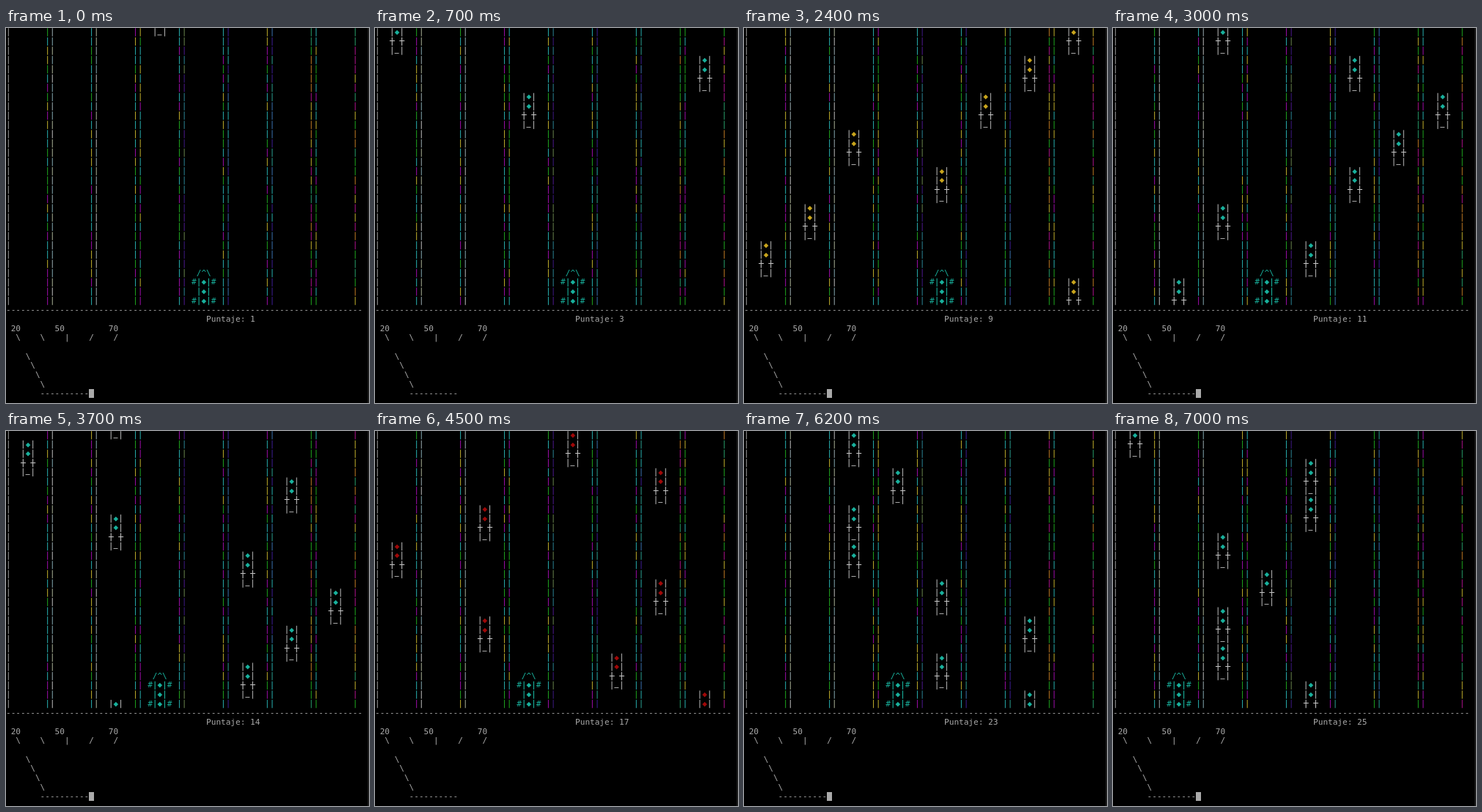
An HTML page with a canvas that plays this animation: 495 px wide and 512 px high, repeating every 7100 ms.

```html
<!DOCTYPE html>
<html lang="es">
<head>
<meta charset="utf-8">
<style>
  html, body { margin: 0; width: 100%; height: 100%; overflow: hidden; background: #000; }
  canvas { display: block; }
</style>
</head>
<body>
<canvas id="screen" width="495" height="512"></canvas>
<script>
const ctx = document.getElementById('screen').getContext('2d');
const LOOP = 7100, STEP = 100;
const CW = 6.66, RH = 12.65, ROAD_ROWS = 30;
const GREY = '#aaaaaa', BRIGHT = '#c4c4c4', TEAL = '#18b09c', YELLOW = '#c8a41c', RED = '#a00808';
const GREEN = '#1c981c', PURPLE = '#900c9c', CYAN = '#24a0a0', GOLD = '#b0a028';

// One car every four rows; each digit is its lane.
const LANES = '3701425675260264642232440';
// Time step and rows scrolled by then.
const SCROLL = [[0, 0], [14, 20], [24, 34], [37, 52], [45, 63], [55, 78], [70, 98]];
const STALLS = [20, 48, 50, 53];
const CURSOR_TOGGLES = [3, 9, 14, 21, 31, 37, 43, 49, 55, 61];

const laneCol = lane => 4 + 9 * lane;

function scrolled(step) {
  const i = Math.max(1, SCROLL.findIndex(([s]) => s >= step));
  const [s0, p0] = SCROLL[i - 1], [s1, p1] = SCROLL[i];
  return Math.round(p0 + (p1 - p0) * (step - s0) / (s1 - s0));
}

function random(a, b, c) {
  const v = Math.sin(a * 12.99 + b * 78.23 + c * 37.72) * 43758.55;
  return v - Math.floor(v);
}

function text(str, col, row, color = GREY) {
  ctx.fillStyle = color;
  [...str].forEach((ch, i) => {
    if (ch !== ' ') ctx.fillText(ch, (col + i) * CW, row * RH + 8.9);
  });
}

function bar(col, row, color = GREY) {
  ctx.fillStyle = color;
  ctx.fillRect(col * CW + 2.8, row * RH + 0.2, 1.1, 11.2);
}

function cross(col, row) {
  bar(col, row, BRIGHT);
  ctx.fillRect(col * CW, Math.round(row * RH + 4.6), 7, 1);
}

function wallColors(col) {
  if (col === 0) return ['#8c8c8c'];
  if (col === 9 || col === 18) return ['#8c9ca0', '#7898a0', '#98a088', GREY];
  if (col === 36) return ['#381878', '#481884', '#287888', '#607848'];
  if (col === 45 || col === 54) return [CYAN, '#3468a0', '#381c88', '#289084'];
  if (col > 60 && col !== 63) return [GREEN, '#b07020', '#a01080', '#249060', GOLD];
  return [GREEN, GOLD, PURPLE, CYAN, CYAN];
}

function drawWalls(seed) {
  for (let col = 0; col < 72; col++) {
    if (col % 9 !== 0 && col % 9 !== 8) continue;
    const colors = wallColors(col);
    for (let row = 0; row < ROAD_ROWS; row++)
      bar(col, row, colors[Math.floor(random(seed, col, row) * colors.length)]);
  }
}

function drawCar(lane, top, color) {
  const col = laneCol(lane);
  for (let i = 0; i < 4; i++) {
    const row = top + i;
    if (row < 0 || row >= ROAD_ROWS) continue;
    const side = i === 2 ? cross : bar;
    side(col - 1, row);
    side(col + 1, row);
    if (i < 2) text('◆', col, row, color);
    if (i === 3) ctx.fillRect(col * CW, Math.round(row * RH + 8.6), 6, 1);
  }
}

function drawPlayer(lane) {
  const col = laneCol(lane);
  text('/^\\', col - 1, 26, TEAL);
  for (let row = 27; row < 30; row++) {
    text(row === 28 ? '  ◆' : '# ◆ #', col - 2, row, TEAL);
    bar(col - 1, row, TEAL);
    bar(col + 1, row, TEAL);
  }
}

function drawPanel(score, cursorOn) {
  text('-'.repeat(73), 0, 30);
  text('Puntaje: ' + score, 41, 31);
  text('20       50         70', 1, 32);
  text('\\    \\    |    /    /', 2, 33);
  for (let i = 0; i < 4; i++) text('\\', 4 + i, 35 + i);
  text('-'.repeat(10), 7, 39);
  if (cursorOn) ctx.fillRect(113, 493, 7, 12);
}

function draw(time) {
  let step = Math.floor(time % LOOP / STEP);
  if (STALLS.includes(step)) step--;
  const offset = scrolled(step);
  const score = 1 + Math.floor((offset + 1) / 4);
  const carColor = score > 6 && score < 11 ? YELLOW : score > 15 && score < 23 ? RED : TEAL;
  const lane = step < 25 ? 4 : step < 65 ? 3 : step < 66 ? 2 : 1;
  const cursorOn = CURSOR_TOGGLES.filter(t => t <= step).length % 2 === 0;

  ctx.fillStyle = '#000';
  ctx.fillRect(0, 0, 495, 512);
  ctx.fillStyle = '#1a1a1a';
  ctx.fillRect(493, 0, 2, 512);
  ctx.font = '11.07px "DejaVu Sans Mono", monospace';
  drawWalls(step);
  [...LANES].forEach((n, i) => drawCar(+n, offset - 3 - 4 * i, carColor));
  drawPlayer(lane);
  drawPanel(score, cursorOn);
}

function tick() {
  draw(performance.now());
  requestAnimationFrame(tick);
}
tick();
</script>
</body>
</html>
```
